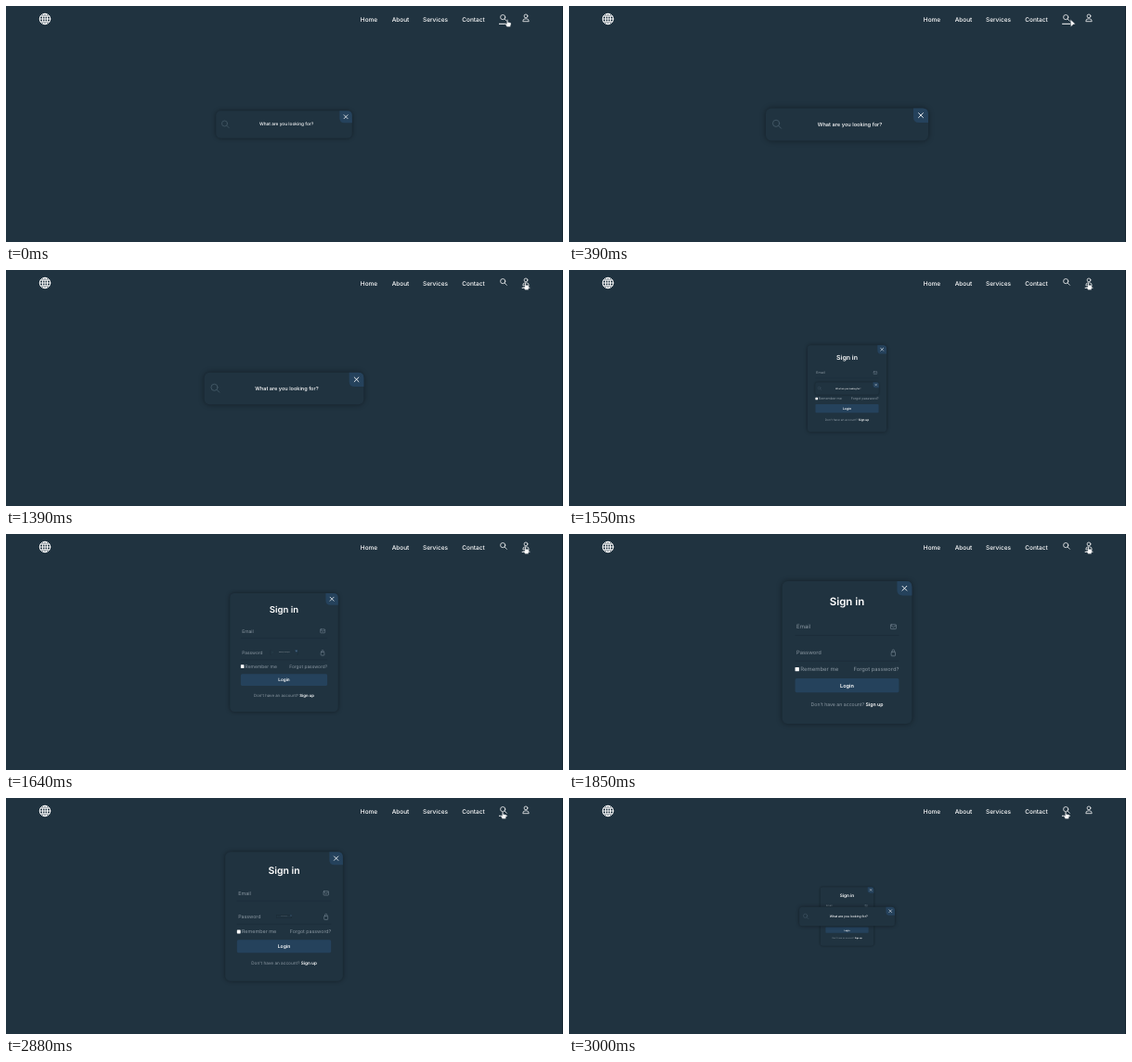
An HTML page for the animation above (3030 ms loop, 600 by 255 pixels).

```html
<!DOCTYPE html>
<html lang="en">
<head>
<meta charset="utf-8">
<title>Sign in and search panels</title>
<style>
  html, body { margin: 0; width: 100%; height: 100%; overflow: hidden; background: #203340; }
  svg { display: block; width: 600px; height: 255px; font-family: Inter, "Open Sans", sans-serif; text-rendering: geometricPrecision; }
  text { fill: #fff; font-weight: 500; }
  .mid { text-anchor: middle; }
  .end { text-anchor: end; }
  .soft { fill: #8b98a2; font-weight: 400; }
  .bold { font-weight: 600; }
  .line { fill: none; stroke: #fff; stroke-linecap: round; stroke-linejoin: round; }
  .dim { stroke: #738491; stroke-width: .7; }
  .panel { fill: #203340; }
  .tab { fill: #25425c; }
</style>
</head>
<body>
<svg viewBox="0 0 600 255">
  <defs>
    <filter id="blur" x="-30%" y="-40%" width="160%" height="180%"><feGaussianBlur stdDeviation="3.2"/></filter>
    <g id="close">
      <path class="tab" d="M0 0H10Q16 0 16 6V15.5H6Q0 15.5 0 9.5Z"/>
      <path class="line" stroke-width=".9" d="M5.6 5.2l4.8 4.8m0-4.8l-4.8 4.8"/>
    </g>
  </defs>
  <rect width="600" height="255" fill="#203340"/>
  <rect x="599" width="1" height="255" fill="#152530"/>

  <g class="line" stroke-width="1" transform="translate(42 14)">
    <circle r="5.7"/>
    <ellipse rx="2.7" ry="5.7"/>
    <path d="M0-5.7V5.7M-5.7 0H5.7M-4.9-2.9H4.9M-4.9 2.9H4.9"/>
  </g>
  <g class="mid" font-size="6.5">
    <text x="391" y="17.2">Home</text>
    <text x="425" y="17.2">About</text>
    <text x="462.5" y="17.2">Services</text>
    <text x="503.5" y="17.2">Contact</text>
  </g>
  <g class="line" stroke-width=".75">
    <circle cx="535.2" cy="12.1" r="2.6"/>
    <path d="M537.1 14l2.3 2.3"/>
    <circle cx="560" cy="10.9" r="1.9"/>
    <path d="M556.8 16.3q0-2.4 2.2-2.4h2q2.2 0 2.2 2.4z"/>
  </g>
  <rect id="searchBar" y="18.8" height="1" fill="#fff"/>
  <rect id="userBar" y="18.8" height="1" fill="#fff"/>

  <g id="login">
    <rect x="-70" y="-77" width="140" height="154" rx="6" fill="#000" opacity=".42" filter="url(#blur)"/>
    <rect class="panel" x="-70" y="-77" width="140" height="154" rx="6"/>
    <use href="#close" x="54" y="-77"/>
    <text class="mid bold" y="-51.3" font-size="11.5">Sign in</text>
    <path d="M-56-18.5H56M-56 9.3H56" stroke="#1a2c39" stroke-width=".7"/>
    <g class="soft" font-size="5.8">
      <text class="soft" x="-54.5" y="-25.7" font-size="6">Email</text>
      <text class="soft" x="-54.5" y="2.3">Password</text>
      <text class="soft" x="-50.4" y="20.4" font-size="6">Remember me</text>
      <text class="soft end" x="56" y="20.4">Forgot password?</text>
    </g>
    <g class="line dim">
      <rect x="47" y="-30.2" width="6" height="4.8" rx=".7"/>
      <path d="M47.4-29.2l2.6 1.9 2.6-1.9"/>
      <rect x="47.7" y="-.6" width="4.4" height="4.4" rx=".7"/>
      <path d="M48.6-.6v-1.1a1.3 1.3 0 0 1 2.6 0v1.1"/>
    </g>
    <rect x="-56" y="16" width="4.3" height="4.3" rx=".6" fill="#fff"/>
    <rect class="tab" x="-56" y="28" width="112" height="15.3" rx="1.8"/>
    <text class="mid bold" y="37.7" font-size="5.6">Login</text>
    <text class="mid soft" y="57.7" font-size="5.2">Don't have an account? <tspan fill="#fff" class="bold">Sign up</tspan></text>
  </g>

  <g id="search">
    <rect x="-87.5" y="-17.5" width="175" height="35" rx="6" fill="#000" opacity=".42" filter="url(#blur)"/>
    <rect class="panel" x="-87.5" y="-17.5" width="175" height="35" rx="6"/>
    <use href="#close" x="71.5" y="-17.5"/>
    <g class="line" stroke-width=".9" style="stroke:#465b69">
      <circle cx="-76.4" cy="-1.2" r="3.6"/>
      <path d="M-73.7 1.5l2.7 2.7"/>
    </g>
    <text class="mid" x="3" y="1.7" font-size="5.7">What are you looking for?</text>
  </g>

  <g stroke="#23333e" stroke-width=".35" fill="#fff">
    <path id="hand" d="M-.6.4Q0-.5.7.4V3L3.4 3.5Q4.2 3.8 4.1 4.6L3.2 8H-.3L-2.2 5.2Q-1.8 4.1-.6 5Z"/>
    <path id="arrow" d="M0 0L5.4 5L3.1 5.3L.5 8Z"/>
  </g>
</svg>
<script>
const LOOP = 3030, DUR = 500;
const LEAD = 268;      // progress of the opening search panel at loop start
const TO_LOGIN = 1375, TO_SEARCH = 2831;
const $ = id => document.getElementById(id);
const clamp = v => Math.min(1, Math.max(0, v));
const mix = (a, b, k) => a + (b - a) * k;

// cubic-bezier(.25, .1, .25, 1)
function ease(x) {
  x = clamp(x);
  let lo = 0, hi = 1;
  for (let i = 0; i < 24; i++) {
    const m = (lo + hi) / 2;
    if (.75 * m * (1 - m) + m ** 3 < x) lo = m; else hi = m;
  }
  const s = 1 - lo;
  return x === 1 ? 1 : .3 * lo * s * s + 3 * lo * lo * s + lo ** 3;
}
const step = (t, start, dur = DUR) => ease((t - start) / dur);
const smooth = (t, a, b) => { const k = clamp((t - a) / (b - a)); return k * k * (3 - 2 * k); };

function scaleAt(id, k) {
  $(id).setAttribute("transform", `translate(299.5 128) scale(${k})`);
  $(id).style.display = k < .004 ? "none" : "";
}

// Grows from the left edge, shrinks toward the right edge.
function bar(id, x, width, k, leaving) {
  $(id).setAttribute("x", leaving ? x + width * (1 - k) : x);
  $(id).setAttribute("width", width * k);
}

function cursor(t) {
  let x, y, hand;
  if (t < 930) {
    const k = smooth(t, 375, 800);
    x = mix(540, 557, k);
    y = mix(14.6, 13.6, k);
    hand = t < 390;
  } else {
    const k = smooth(t, 1925, 2110);
    x = mix(559.4, 535, k);
    y = mix(13.4, 14.4, k);
    hand = t < 1960 || t >= 2060;
  }
  for (const id of ["hand", "arrow"]) {
    $(id).setAttribute("transform", `translate(${x} ${y})`);
    $(id).style.display = (id === "hand") === hand ? "" : "none";
  }
}

function draw(t) {
  let open;
  if (t < TO_LOGIN) open = step(t, -LEAD);
  else if (t < TO_SEARCH) open = 1 - step(t, TO_LOGIN);
  else open = step(t, TO_SEARCH);
  scaleAt("search", open);
  scaleAt("login", 1 - open);

  const back = t >= 2040;
  bar("searchBar", 531, 9, back ? step(t, 2040, 400) : 1 - step(t, 375), !back);
  const left = t >= 1925;
  bar("userBar", 555.7, 8.6, left ? 1 - step(t, 1925) : step(t, 930), left);
  cursor(t);
}

const t0 = performance.now();
function tick() {
  draw((performance.now() - t0) % LOOP);
  requestAnimationFrame(tick);
}
tick();
</script>
</body>
</html>
```
